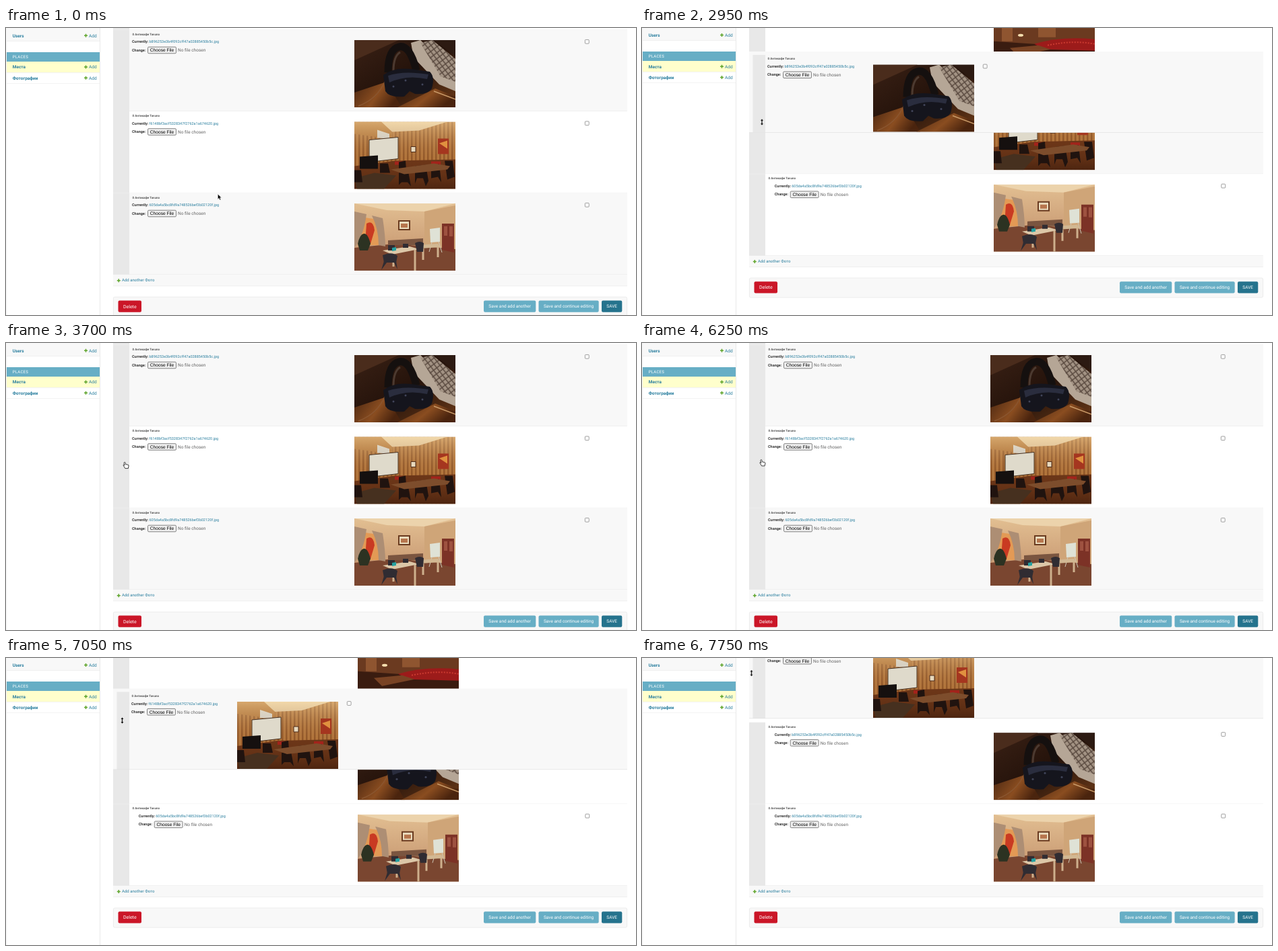
Recreate the animation shown at these times as an HTML page. Size 935x427 px, loop 8 s.

```html
<!DOCTYPE html>
<html lang="ru">
<head>
<meta charset="utf-8">
<title>Admin: photo sorting</title>
<style>
  html, body { margin: 0; width: 100%; height: 100%; overflow: hidden; background: #fff; }
  svg { display: block; width: 935px; height: 427px; }
  text { font-family: Roboto, "Open Sans", sans-serif; text-rendering: geometricPrecision; white-space: pre; }
</style>
</head>
<body>
<svg viewBox="0 0 935 427" xmlns="http://www.w3.org/2000/svg">
  <defs>
    <clipPath id="frame"><rect width="150" height="100"/></clipPath>
    <linearGradient id="desk" x2="1" y2="1">
      <stop stop-color="#3a2115"/><stop offset=".5" stop-color="#25130b"/><stop offset="1" stop-color="#6b3a18"/>
    </linearGradient>
    <linearGradient id="wood" x2="1" y2=".4">
      <stop stop-color="#4a2611"/><stop offset=".6" stop-color="#8a4d20"/><stop offset="1" stop-color="#4a240e"/>
    </linearGradient>
    <linearGradient id="wall" x2="0" y2="1">
      <stop stop-color="#e2bf92"/><stop offset=".6" stop-color="#cda078"/><stop offset="1" stop-color="#b08058"/>
    </linearGradient>
    <linearGradient id="glow" x2="0" y2="1">
      <stop stop-color="#ffe2ac" stop-opacity=".45"/><stop offset=".6" stop-color="#7a3d18" stop-opacity=".1"/>
      <stop offset="1" stop-color="#200c04" stop-opacity=".4"/>
    </linearGradient>
    <pattern id="stripes" width="6" height="100" patternUnits="userSpaceOnUse">
      <rect width="6" height="100" fill="#b97c40"/><rect width="2.5" height="100" fill="#945a2a"/>
    </pattern>
    <pattern id="keys" width="7" height="6" patternUnits="userSpaceOnUse" patternTransform="rotate(52)">
      <rect width="7" height="6" fill="#5a4a40"/><rect width="5.5" height="4.5" fill="#a39384"/>
    </pattern>

    <g id="photo0" clip-path="url(#frame)">
      <rect width="150" height="100" fill="url(#desk)"/>
      <path d="M0 30L44 10 66 0H0z" fill="#4a2c1c"/>
      <path d="M0 78L48 62 70 100H0z" fill="url(#wood)"/>
      <path d="M84 4L98 0 150 50V76L126 66 88 26z" fill="#b5a696"/>
      <path d="M98 4L116 0 150 28V62L128 54z" fill="url(#keys)"/>
      <path d="M118 0H150V24z" fill="#2c1a12"/>
      <path d="M50 48Q50 14 66 10T92 45" fill="none" stroke="#15100f" stroke-width="11"/>
      <path d="M58 46Q58 24 68 18" fill="none" stroke="#4c3a30" stroke-width="3"/>
      <path d="M6 98Q34 88 46 60" fill="none" stroke="#8a5630" stroke-width="1.5"/>
      <path d="M64 100L120 72 150 84V100z" fill="url(#wood)"/>
      <path d="M43 52Q58 40 84 43L112 47Q120 55 115 72 108 82 90 80L82 76 74 84Q52 86 46 76z" fill="#15151d"/>
      <path d="M50 53Q72 45 110 51L108 58Q78 51 52 63z" fill="#2a2d3e"/>
      <g fill="#41455a"><circle cx="58" cy="69" r="1.5"/><circle cx="76" cy="60" r="1.5"/><circle cx="101" cy="66" r="1.5"/></g>
      <path d="M118 76L150 88" stroke="#c99a68" stroke-width="1.5"/>
    </g>

    <g id="photo1" clip-path="url(#frame)">
      <rect width="150" height="100" fill="url(#stripes)"/>
      <path d="M38 0H138L96 13 56 15z" fill="#e6cfa8"/>
      <path d="M0 0H40L56 15V26L0 18z" fill="#b5783a"/>
      <path d="M34 12L52 18V25L34 24z" fill="#dbe4e6"/>
      <path d="M0 66L60 58 150 56V100H0z" fill="#6a3518"/>
      <rect width="150" height="100" fill="url(#glow)"/>
      <path d="M22 27L65 23V55L22 60z" fill="#dfdacb" stroke="#453021"/>
      <path d="M124 25H140V48H124z" fill="#a5361f"/><path d="M126 32L138 28V40z" fill="#e0913f"/>
      <path d="M84 37H91V45H84z" fill="#e8d9bd" stroke="#4c2a18"/>
      <path d="M8 52L35 50V70H8z" fill="#15100f"/>
      <path d="M114 59H128V64H114zM60 59H72V64H60z" fill="#a3231b"/>
      <path d="M0 84L30 76 62 80 44 100H4z" fill="#46301f"/>
      <g fill="#20130f">
        <path d="M66 60L76 58 77 72H66zM90 66L106 64 110 88 106 96 102 84H93L90 92z"/>
        <path d="M114 65L126 63 129 90 124 82 114 84zM134 58H146L149 82 138 86zM66 76L80 74 84 96 79 90H70L66 94z"/>
        <path d="M0 72H10L12 90H0zM38 62H50L53 76H38z"/>
      </g>
      <path d="M54 71L118 62 142 66 138 71 74 78z" fill="#7d4d2c"/>
    </g>

    <g id="photo2" clip-path="url(#frame)">
      <rect width="150" height="100" fill="url(#wall)"/>
      <path d="M0 0H150L104 12 48 10z" fill="#ecd3ac"/>
      <path d="M104 12L150 3V80L104 66z" fill="#cfa578"/>
      <path d="M0 66L60 60 150 68V100H0z" fill="#7a4630"/>
      <path d="M8 20L36 24V62H8z" fill="#e39a55"/>
      <path d="M18 30Q28 24 30 40L24 60H16z" fill="#c93a22"/>
      <path d="M0 12L18 16Q14 48 0 66zM26 18L42 22Q46 48 46 64L36 62Q36 38 26 18z" fill="#ad8e74"/>
      <path d="M5 60Q8 46 14 45T24 60L20 70H8z" fill="#2c3222"/>
      <path d="M66 26H82V39H66z" fill="#eadcbd" stroke="#6a3b20" stroke-width="2"/>
      <path d="M69 30H79V36H69z" fill="#b7754d"/>
      <path d="M130 30H148V73L130 69z" fill="#7c3226"/><path d="M133 34H138V48H133zM141 34H146V49H141z" fill="#9e5240"/>
      <path d="M112 38L127 36V57L113 58z" fill="#dfe2d6"/><path d="M115 58L111 72M125 57L130 73" stroke="#cfc8b9"/>
      <path d="M50 55L102 52V62H50z" fill="#7a5540"/>
      <path d="M42 70L82 64 96 68 56 76z" fill="#dcc7a8"/><path d="M94 62L124 60 128 65 98 67z" fill="#d2b893"/>
      <path d="M58 75V94M90 69V100M102 67V84M124 65V80" stroke="#ceb08d" stroke-width="3"/>
      <g fill="#302c32">
        <path d="M42 77Q56 71 64 78L62 88H44zM90 59Q97 55 103 59L102 72H93zM72 60H80V66H72zM50 62H60V70H50z"/>
        <path d="M44 86L40 99 48 88H59L64 98 62 86z"/>
      </g>
      <path d="M56 66L62 65V70L56 71z" fill="#24a0a0"/>
    </g>

    <g id="photo3" clip-path="url(#frame)">
      <rect width="150" height="100" fill="#3a1c10"/>
      <path d="M0 0H150V28L60 34 0 30z" fill="#6b3a20"/>
      <path d="M12 8H28V30H12zM66 8H92V24H66z" fill="#8f5530"/>
      <ellipse cx="40" cy="21" rx="4" ry="2" fill="#f6dfb0"/>
      <path d="M60 34Q100 22 150 27V44L76 42z" fill="#9c1b1a"/>
      <path d="M80 36Q118 28 150 34" fill="none" stroke="#cb3a30" stroke-width="2" stroke-dasharray="2 2"/>
      <path d="M24 40L66 36 84 42 36 52z" fill="#794324"/>
    </g>

    <g id="arrow"><path d="M-2.7-4.5V3.4L-.9 1.8.4 4.6 1.9 3.9.6 1.2H3z" fill="#000" stroke="#fff" stroke-width=".6"/></g>
    <g id="hand"><path d="M-2.4-4.5Q-1.2-5.2-.9-3.8L-.4-1.4 3-.8Q4.3-.5 4.1.8L3.3 4.6H-1.2L-4-.2Q-3.8-1.2-2.7-.6L-1.9.2-2.9-3.6Q-3-4.2-2.4-4.5z" fill="#fff" stroke="#111" stroke-width=".8"/></g>
    <g id="resize"><path d="M0-4.7L2.3-2H.8V2H2.3L0 4.7-2.3 2H-.8V-2H-2.3z" fill="#000" stroke="#fff" stroke-width=".4"/></g>
  </defs>
  <g id="stage"></g>
</svg>
<script>
const LOOP = 8000, STEP = 50, ROW = 121.5;
const LINK = '#2b7f9f', BAR = '#67aec5', PALE = '#f8f8f8', LINE = '#ebebeb', GRIP = '#e8e8e8';
const FILES = [
  'b896253e3b4f092cff47a02885450b5c.jpg',
  'f6148bf3acf5328347f2762a1a674620.jpg',
  '605da4a5bc8fd9a748526bef3b02120f.jpg'
];

// time, pointer centre x, y, top of the carried row
const TRACK = [
  [0, 317, 251.5, 0], [450, 317, 251.5, 0], [1250, 219, 140.5, 0], [1600, 219, 140.5, 0],
  [2000, 176.5, 104, 0], [2750, 176.5, 104, -1], [2950, 178, 140, 35], [3600, 178, 181, 76],
  [3700, 178, 182, 77], [6200, 178, 182, 128], [6250, 178.8, 178.3, 125], [6900, 172.5, 93, 45.5],
  [7050, 172.5, 93, 45.5], [7750, 162.5, 22.5, -30.5], [LOOP, 162.5, 22.5, -30.5]
];

function poseAt(t) {
  const i = Math.max(1, TRACK.findIndex(k => k[0] > t));
  const a = TRACK[i - 1], b = TRACK[i], f = (t - a[0]) / (b[0] - a[0]);
  const [, x, y, top] = a.map((v, n) => v + (b[n] - v) * f);
  return { x, y, top };
}

const rect = (x, y, w, h, fill, more = '') =>
  `<rect x="${x}" y="${y}" width="${w}" height="${h}" fill="${fill}" ${more}/>`;
// y is the middle of the capital letters
const label = (x, y, size, str, fill = '#333', more = '') =>
  `<text x="${x}" y="${y + size * .36}" font-size="${size}" fill="${fill}" ${more}>${str}</text>`;
const shift = (x, y, body) => `<g transform="translate(${x} ${y})">${body}</g>`;
const use = (id, x, y) => `<use href="#${id}" x="${x}" y="${y}"/>`;
const BOLD = 'font-weight="700"', MID = 'text-anchor="middle"', CRISP = 'shape-rendering="crispEdges"';
const plus = (x, y) => `<path d="M${x - 2.5} ${y}h5M${x} ${y - 2.5}v5" stroke="#5fa52c" stroke-width="1.5"/>`;

function fileField(file, hover) {
  return label(0, 0, 5.5, 'Currently:', '#333', BOLD) +
    label(25.5, 0, 5.5, file, hover ? '#003366' : LINK) +
    label(0, 12.2, 5.5, 'Change:', '#333', BOLD) +
    rect(23.5, 7.7, 42, 9.6, '#efefef', 'rx="1.5" stroke="#666" stroke-width=".8"') +
    label(44.5, 12.5, 6.67, 'Choose File', '#000', MID + ' style="font-family:Liberation Sans,Arial,sans-serif"') +
    label(68, 12.5, 6.5, 'No file chosen', '#666');
}

const checkbox = (x, y) => rect(x - 2.9, y - 2.9, 5.8, 5.8, '#fff', 'rx="1" stroke="#767676" stroke-width=".7"');
const title = (x, y) => label(x, y, 4.5, '0 Антикафе Tavuno', '#555', BOLD);
const rowBase = fill =>
  rect(159, 0, 763, ROW, fill) + rect(159, 0, 24, ROW, GRIP) + rect(159, ROW - .6, 763, .6, LINE);

function row(i, top, fill, loose, hover) {
  return shift(0, top,
    rowBase(fill) + title(187.5, 6.5) +
    shift(loose ? 196.7 : 187, 18, fileField(FILES[i], hover)) +
    use('photo' + i, loose ? 522 : 517, 15.5) + checkbox(loose ? 862.8 : 862.3, 17.8));
}

// Only the lower part of the row above is ever in view.
const rowAbove = top => shift(0, top, rowBase('#fff') + use('photo3', 522, 15.5));

function carriedRow(i, top, fill) {
  return shift(0, top,
    rect(159, 0, 763, 120.5, fill) + rect(164.5, 5, 18.5, 115.5, GRIP) + rect(159, 120, 763, .7, '#e2e2e2') +
    title(186.5, 10.5) + shift(186, 22.2, fileField(FILES[i])) +
    use('photo' + i, 343, 19.5) + checkbox(509.2, 22));
}

function sidebar(dy) {
  const item = (y, name) => label(9.7, y, 6.5, name, LINK, BOLD) +
    plus(118.5, y) + label(123, y, 6.5, 'Add', LINK);
  return rect(0.5, 0, .7, 427, LINE) + rect(139, 0, .8, 427, '#e4e4e4') +
    shift(0, dy,
      rect(1, 0, 138, 19.5, PALE) + rect(1, 19, 138, .6, LINE) + item(11.2, 'Users') +
      rect(1, 36, 138, 14, BAR, CRISP) + label(9.7, 42.5, 6, 'PLACES', '#fff', 'letter-spacing=".25"') +
      rect(1, 50, 138, 16, '#ffffcc', CRISP) + item(57.9, 'Места') +
      rect(1, 66, 138, .6, LINE) + item(74.3, 'Фотографии') + rect(1, 82, 138, .6, LINE));
}

function footer(dy) {
  const button = (x, w, str, fill, size = 6.5) =>
    rect(x, 405.5, w, 17.2, fill, 'rx="2"') + label(x + w / 2, 414.1, size, str, '#fff', MID);
  return shift(0, dy,
    rect(159, 367, 763, 17, PALE) + rect(159, 383.5, 763, .7, LINE) +
    plus(167.3, 375.7) + label(172, 375.2, 6, 'Add another Фото', LINK) +
    rect(159.4, 400.2, 762.2, 29, PALE, 'rx="2" stroke="#e8e8e8" stroke-width=".8"') +
    button(166.5, 34.5, 'Delete', '#cb1628', 7) +
    button(709, 77.3, 'Save and add another', BAR) +
    button(790.5, 89.2, 'Save and continue editing', BAR) +
    button(884, 30.3, 'SAVE', '#25738d'));
}

function scene(t) {
  const { x, y, top } = poseAt(t);
  const first = t >= 2800 && t < 3650, second = t >= 6350;
  const carrying = first || second;
  const hover = t >= 1250 && t < 1650;
  const dy = carrying ? -28.25 : 0;
  const third = 245.5 + dy;
  let rows;

  if (carrying) {
    const swapped = second && y < 156;
    rows = (top > -22 ? rowAbove(third - 2 * ROW) : '') +
      row(first ? 1 : 0, third - ROW, swapped ? '#fff' : PALE, true) +
      row(2, third, '#fff', true) +
      carriedRow(first ? 0 : 1, top, first || swapped ? PALE : '#fff');
  } else {
    rows = rect(159, 2, 763, .6, LINE) + rect(159, 0, 24, 2, GRIP) +
      row(0, 2.5, PALE) + row(1, 124, '#fff', false, hover) + row(2, 245.5, PALE);
  }

  const pointer = carrying ? 'resize' : hover || x < 184 ? 'hand' : 'arrow';
  return sidebar(carrying ? -.7 : 0) + footer(dy) + rows + use(pointer, x, y);
}

const stage = document.getElementById('stage');
const start = performance.now();
let shown = -1;

function draw(now) {
  const t = Math.floor(Math.max(0, now - start) % LOOP / STEP) * STEP;
  if (t !== shown) {
    stage.innerHTML = scene(t);
    shown = t;
  }
  requestAnimationFrame(draw);
}
draw(start);
</script>
</body>
</html>
```
